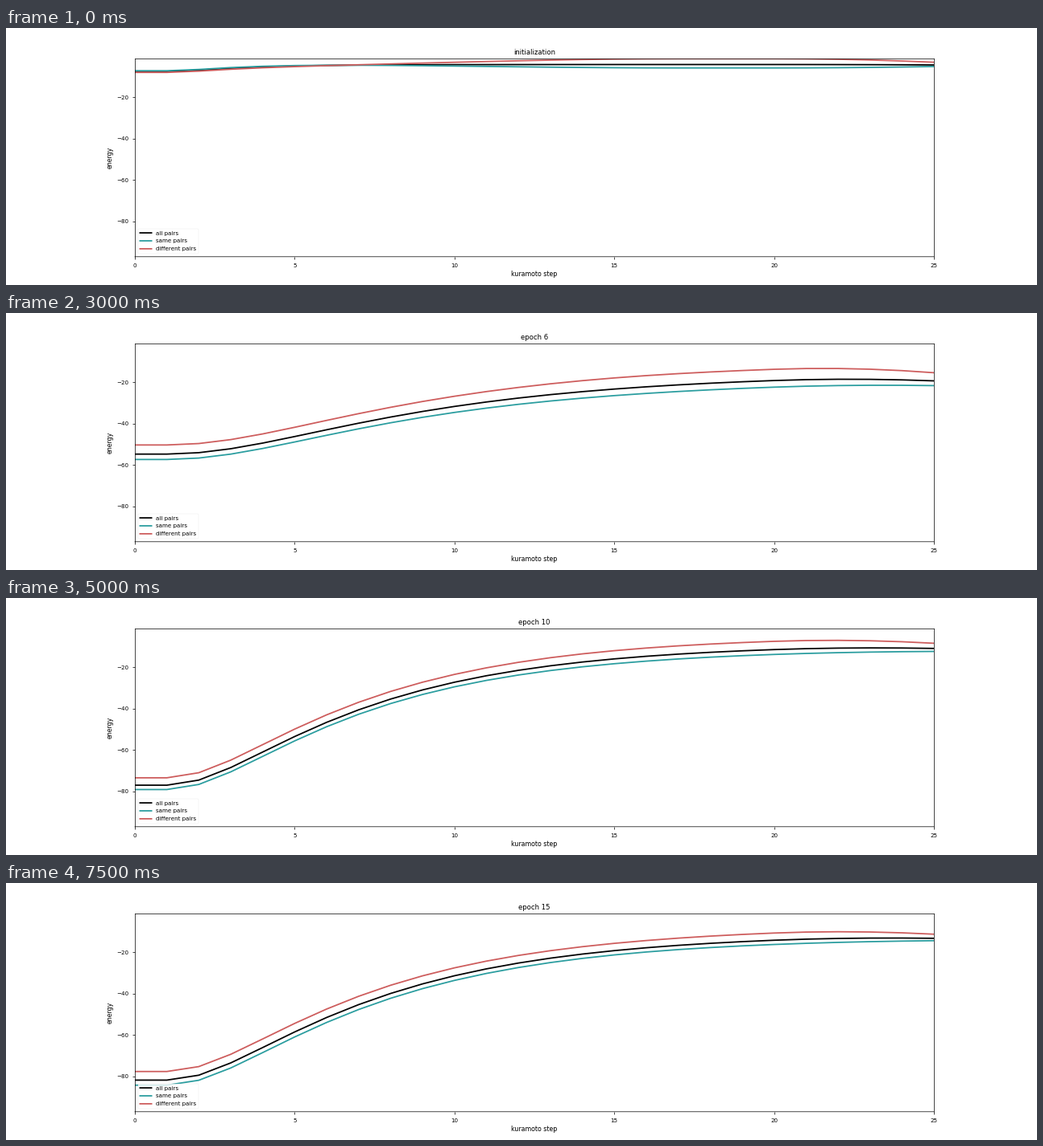
A matplotlib script for the animation above (8000 ms loop, 1280x320 px).

```python
import numpy as np
import matplotlib.pyplot as plt
from matplotlib.animation import FuncAnimation

plt.rcParams.update({
    "font.family": "DejaVu Sans",
    "axes.titlesize": 9.6,
    "axes.labelsize": 8.8,
    "legend.fontsize": 8,
    "legend.labelspacing": 0.55,
    "xtick.labelsize": 8,
    "ytick.labelsize": 8,
    "xtick.major.pad": 5.6,
    "ytick.major.pad": 5.6,
    "patch.linewidth": 0.24,
    "lines.linewidth": 2,
})

STEPS = np.arange(26)

# Energy at step 0, one value per epoch.
START = [-7.4, -10, -10.9, -23.4, -37.4, -37.3, -54.7, -56.4,
         -73.4, -75.5, -77, -76.9, -77.7, -76.8, -76.5, -81.8]

# Curve parameters at a few epochs, linear in between.
KEY_EPOCHS = [0, 4, 6, 8, 10, 12, 15]
PARAMS = {
    "level": [-4.1, -12, -15.5, -11.5, -8.5, -9.8, -10.7],  # energy approached late
    "rate": [0.5, 0.165, 0.158, 0.182, 0.19, 0.2, 0.183],   # speed of the approach
    "bend": [1, 9, 4.4, 2.9, 2.5, 2.3, 2.6],                # softness of the onset
    "droop": [0.2, 2.5, 2.1, 0.7, 1.2, 0.75, 1.1],          # fall after step 20
    "near": [-0.3, 2.5, 2.6, 2.0, 2.1, 2.45, 2.45],         # spread at the start
    "far": [1.65, 2.35, 3.2, 2.4, 2.35, 2.2, 2.05],         # spread at the end
}

# label, colour, share of the spread, extra droop
CURVES = [
    ("all pairs", "black", 0, 0),
    ("same pairs", "#2a9d9f", -1, -0.9),
    ("different pairs", "indianred", 1.7, 1.5),
]


def smoothstep(t):
    t = np.clip(t, 0, 1)
    return t * t * (3 - 2 * t)


def energies(epoch):
    p = {k: np.interp(epoch, KEY_EPOCHS, v) for k, v in PARAMS.items()}
    delay = max(1, p["bend"] / 4.5)
    x = np.maximum(STEPS - delay, 0)
    decay = np.exp(-p["rate"] * (np.hypot(x, p["bend"]) - p["bend"]))
    mean = p["level"] + (START[epoch] - p["level"]) * decay
    spread = p["near"] + (p["far"] - p["near"]) * smoothstep((STEPS - 3) / 14)
    tail = np.clip((STEPS - 20) / 5, 0, 1) ** 2
    return [mean + share * spread - (p["droop"] + extra) * tail
            for _, _, share, extra in CURVES]


fig, ax = plt.subplots(figsize=(20, 5), dpi=64)
lines = [ax.plot(STEPS, y, color=color, label=label)[0]
         for (label, color, *_), y in zip(CURVES, energies(0))]
ax.set(xlim=(0, 25), ylim=(-97.1, -1.35), xlabel="kuramoto step", ylabel="energy")
ax.set_xticks(range(0, 26, 5))
ax.set_yticks(range(-80, 0, 20))
ax.spines["bottom"].set_snap(False)
for handle in ax.legend(loc="lower left").get_lines():
    handle.set_snap(False)
title = ax.set_title("initialization")


def update(epoch):
    for line, y in zip(lines, energies(epoch)):
        line.set_ydata(y)
    title.set_text(f"epoch {epoch}" if epoch else "initialization")
    return [*lines, title]


anim = FuncAnimation(fig, update, frames=len(START), interval=500,
                     repeat=True, repeat_delay=0)
plt.show()
```
